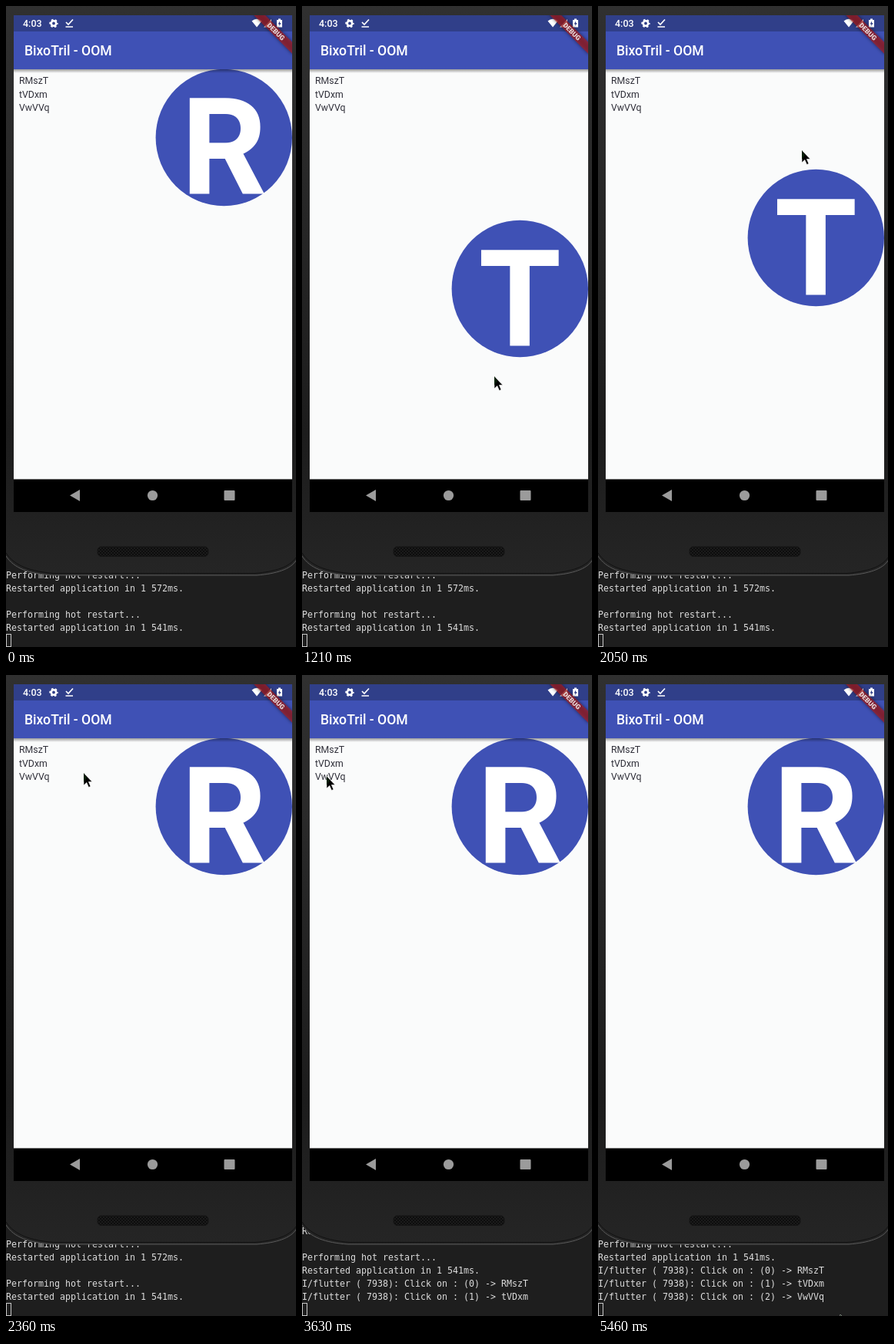
An HTML page that plays this animation: 377x831 px, repeating every 5840 ms.

```html
<!DOCTYPE html>
<html lang="en">
<head>
<meta charset="utf-8">
<title>List demo</title>
<style>
  html, body { margin: 0; width: 100%; height: 100%; overflow: hidden; background: #1e1e1e; }
  svg { display: block; width: 377px; height: 831px; }
  text { font-family: Roboto, sans-serif; white-space: pre; }
  #terminal text { font: 11.63px "DejaVu Sans Mono", monospace; fill: #dcdcdc; }
</style>
</head>
<body>
<svg viewBox="0 0 377 831">
  <defs>
    <linearGradient id="shell" x2="0" y2="1">
      <stop offset="0" stop-color="#303030"/>
      <stop offset=".3" stop-color="#282828"/>
      <stop offset=".75" stop-color="#1c1c1c"/>
      <stop offset="1" stop-color="#252525"/>
    </linearGradient>
    <linearGradient id="drop" x2="0" y2="1">
      <stop offset="0" stop-opacity=".38"/>
      <stop offset="1" stop-opacity="0"/>
    </linearGradient>
    <pattern id="mesh" width="4" height="4" patternUnits="userSpaceOnUse">
      <rect width="4" height="4" fill="#0d0d0d"/>
      <circle cx="1" cy="1" r=".8" fill="#2c2c2c"/>
      <circle cx="3" cy="3" r=".8" fill="#2c2c2c"/>
    </pattern>
    <clipPath id="screen"><rect x="10" y="12" width="362" height="644"/></clipPath>
    <filter id="soft" x="-20%" y="-60%" width="140%" height="220%"><feGaussianBlur stdDeviation="2"/></filter>
  </defs>

  <rect width="377" height="831" fill="#1e1e1e"/>
  <g id="terminal"></g>
  <rect x=".5" y="814.5" width="6" height="16" fill="none" stroke="#c8c8c8"/>

  <!-- phone body -->
  <path d="M0 0H377V719C370 730 352 736 326 738H60C30 736 10 729 0 713Z" fill="url(#shell)"/>
  <path d="M0 713C10 729 30 736 60 738H326C352 736 370 730 377 719" fill="none" stroke="#5a5a5a"/>
  <path d="M0 709C11 726 32 733 62 735.500H324C350 733 368 728 377 715" fill="none" stroke="#111"/>
  <rect x="119" y="701" width="144" height="12.5" rx="5" fill="url(#mesh)" stroke="#141414"/>

  <g clip-path="url(#screen)">
    <rect x="10" y="82" width="362" height="532" fill="#fafbfb"/>
    <g id="list" font-size="12.3" fill="#30303a"></g>
    <g id="thumb">
      <circle cx="283.3" cy="88.5" r="88.7" fill="#3f51b5"/>
      <text id="letter" x="283.3" y="161.5" font-size="174" font-weight="700" fill="#fff" text-anchor="middle"></text>
    </g>
    <rect x="10" y="82" width="362" height="5" fill="url(#drop)"/>
    <rect x="10" y="33" width="362" height="49" fill="#3f51b5"/>
    <rect x="10" y="12" width="362" height="21" fill="#303f89"/>
    <text x="24" y="64" font-size="17.6" font-weight="500" fill="#fff">BixoTril - OOM</text>

    <!-- status icons -->
    <g fill="#fff">
      <text x="22" y="27" font-size="12.5" font-weight="500">4:03</text>
      <circle cx="62" cy="22.5" r="3.2" fill="none" stroke="#fff" stroke-width="2.6"/>
      <circle cx="62" cy="22.5" r="4.8" fill="none" stroke="#fff" stroke-width="1.8" stroke-dasharray="2.5 2.53" stroke-dashoffset="1.25"/>
      <path d="M78 21l3 3 6-6.500M77.500 27h9.500" fill="none" stroke="#fff" stroke-width="1.7"/>
      <path d="M319.500 19.500Q326 14 332.500 19.500L326 27.500Z"/>
      <path d="M335 27.500H345V17Z"/>
      <path d="M352 18h2v-1.500h3V18h2v9.500h-7Z"/>
      <path d="M356 19.500l-2.300 4h1.600v2.500l2.300-4H356Z" fill="#303f89"/>
    </g>
    <g transform="translate(372 12) rotate(45)">
      <rect x="-36" y="24.6" width="72" height="10.6" fill="#000" opacity=".5" filter="url(#soft)"/>
      <rect x="-36" y="24.6" width="72" height="10.6" fill="#b71c1c" opacity=".63"/>
      <text y="33" font-size="8.8" font-weight="900" fill="#eadcdc" text-anchor="middle">DEBUG</text>
    </g>

    <!-- navigation bar -->
    <rect x="10" y="613.5" width="362" height="43"/>
    <g fill="#9b9b9b">
      <path d="M83 634.500L96 627V642Z"/>
      <circle cx="190.5" cy="634.5" r="6.6"/>
      <rect x="283.5" y="628" width="14" height="13" rx="1"/>
    </g>
  </g>

  <g id="pointer">
    <path id="arrow" d="M0 0V16L3.800 12.500L6.500 18.500L9 17.400L6.400 11.500H11Z" stroke="#fff" stroke-width=".6"/>
    <path d="M0 0V12L4 6Z" fill="#062006"/>
  </g>
</svg>

<script>
const LOOP = 5840, STEP = 65, PHASE = 40;
const ROW = 17;
const TOP = 82, BOTTOM = 386;
const items = ["RMszT", "tVDxm", "VwVVq"];
const clickTimes = [3060, 3560, 3990];

// time, x, y where the hand turns or rests
const stops = [
  [60, 309, 791], [640, 258, 203], [1260, 250, 485], [1530, 269, 504], [1680, 269, 504],
  [2183, 264, 130], [2360, 72, 127], [2560, 68, 127], [2810, 42, 102], [3060, 42, 102],
  [3130, 38, 115], [3630, 32, 131], [4130, 32, 131], [4500, 114, 252], [4850, 118, 144],
  [5450, 315, 830]
];

const byId = id => document.getElementById(id);
const place = (id, x, y) => byId(id).setAttribute("transform", `translate(${x} ${y})`);
const show = (node, on) => node.setAttribute("visibility", on ? "visible" : "hidden");
const mix = (a, b, k) => Math.round(a + (b - a) * k);

// Sine ease in and out between two times.
function ease(t, from, to) {
  const k = Math.min(1, Math.max(0, (t - from) / (to - from)));
  return (1 - Math.cos(Math.PI * k)) / 2;
}

function addText(parent, x, y, content) {
  const node = document.createElementNS("http://www.w3.org/2000/svg", "text");
  node.setAttribute("x", x);
  node.setAttribute("y", y);
  node.textContent = content;
  byId(parent).append(node);
  return node;
}

function pointerAt(t) {
  const i = Math.max(1, stops.findIndex(stop => stop[0] > t));
  const [from, x0, y0] = stops[i - 1], [to, x1, y1] = stops[i];
  const k = ease(t, from, to);
  return [mix(x0, x1, k), mix(y0, y1, k)];
}

// The thumb trails the hand: down to the end, then back up.
const thumbAt = t => mix(TOP, BOTTOM, ease(t, 610, 1620) - ease(t, 1782, 2281));

items.forEach((item, i) => addText("list", 17, 101 + 17.5 * i, item));
const clickLines = items.map((item, i) => `I/flutter ( 7938): Click on : (${i}) -> ${item}`);
const log = [
  "Performing hot restart...", "Restarted application in 1 572ms.", "",
  "Performing hot restart...", "Restarted application in 1 541ms.", ...clickLines
].map((line, i) => addText("terminal", 0, 742 + ROW * i, line));

function draw(time) {
  // The screen refreshes in even steps.
  const t = PHASE + STEP * Math.floor((time - PHASE + 8) / STEP);

  const top = thumbAt(t);
  place("thumb", 0, top);
  const index = Math.min(2, Math.floor((top - TOP) / 118));
  byId("letter").textContent = items[index][0].toUpperCase();

  const clicks = clickTimes.filter(click => click <= time).length;
  place("terminal", 0, -ROW * clicks);
  log.slice(-items.length).forEach((line, i) => show(line, i < clicks));

  const visible = t >= 60 && t < 5450;
  show(byId("pointer"), visible);
  if (!visible) return;
  const [x, y] = pointerAt(t);
  place("pointer", x, y);
  const overThumb = Math.hypot(x - 283, y - top - 88) < 88;
  byId("arrow").setAttribute("fill", overThumb ? "#168a22" : "#000");
}

const start = performance.now();
function frame() {
  draw((performance.now() - start) % LOOP);
  requestAnimationFrame(frame);
}
frame();
</script>
</body>
</html>
```
